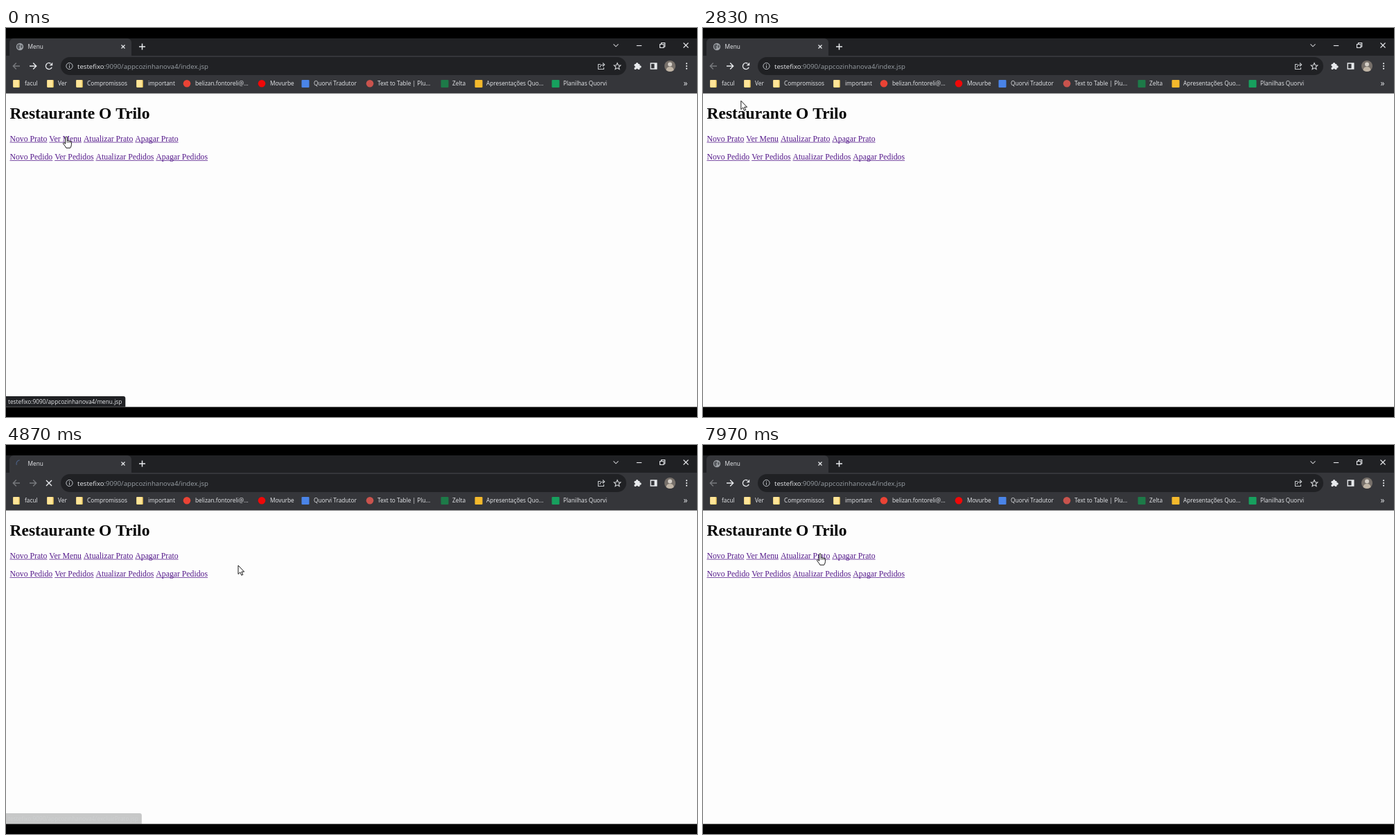
These frames come from a looping animation (997 by 562 pixels, 8 s). An HTML page with a canvas:

```html
<!DOCTYPE html>
<html lang="pt">
<head>
<meta charset="utf-8">
<title>Menu</title>
<style>
html, body { margin: 0; width: 100%; height: 100%; overflow: hidden; background: #000; }
canvas { display: block; }
</style>
</head>
<body>
<canvas id="stage" width="997" height="562"></canvas>
<script>
const ctx = document.getElementById('stage').getContext('2d');
const LOOP = 8000;
const UI = '"Open Sans", "Noto Sans", sans-serif';
const SERIF = '"Liberation Serif", "Times New Roman", serif';
const LIGHT = '#e8eaed', GREY = '#9aa0a6', DIM = '#77797d';
const DARK = '#202124', BAR = '#35363a';
const HOST = 'testefixo', PATH = ':9090/appcozinhanova4/';

// page shown: [from, page, forward enabled]
const PAGES = [
  [0, 'index', true], [1500, 'menu', false], [2200, 'index', true],
  [3550, 'index', false], [5500, 'menu', false], [6640, 'index', true]
];
const LOADS = [[1010, 1500], [3550, 5500]];
const STATUS = [
  [0, 1480, 'menu.jsp'], [3050, 4020, 'menu.jsp'],
  [4020, 4300, 'atualizarPrato.jsp'], [4300, 4780, 'excluirPrato.jsp']
];
const FADE = 120;
// pointer: time, x, y
const POINTER = [
  [0, 87, 157], [400, 87, 157], [1000, 85, 162], [1400, 85, 162],
  [1830, 20, 71], [1980, 15, 54], [2470, 15, 54], [3200, 96, 158],
  [3670, 99, 156], [3900, 99, 156], [4400, 212, 160], [4850, 335, 174],
  [4970, 335, 174], [5600, 645, 160], [5800, 645, 160], [6070, 0, 41],
  [6360, 14, 53], [6640, 14, 53], [7380, 58, 190], [7920, 169, 157], [8000, 169, 157]
];
const LINKS = [
  [163.5, ['Novo Prato', 'Ver Menu', 'Atualizar Prato', 'Apagar Prato']],
  [190, ['Novo Pedido', 'Ver Pedidos', 'Atualizar Pedidos', 'Apagar Pedidos']]
];
// bookmark: icon centre, text x, label, icon kind, colour
const BOOKMARKS = [
  [15, 27, 'facul', 'folder'], [64, 75, 'Ver', 'folder'],
  [106, 117, 'Compromissos', 'folder'], [193, 205, 'important', 'folder'],
  [261, 273, 'belizan.fontoreli@...', 'dot', '#ea4335'],
  [369, 381, 'Movurbe', 'dot', '#f00808'],
  [432, 444, 'Quorvi Tradutor', 'box', '#4a84e8'],
  [525, 536, 'Text to Table | Plu...', 'dot', '#c9534d'],
  [633, 644, 'Zelta', 'box', '#1d7a48'],
  [682, 693, 'Apresentações Quo...', 'box', '#f4b92c'],
  [793, 804, 'Planilhas Quorvi', 'box', '#17a05e']
];

function rect(x, y, w, h, color, r = 0) {
  ctx.fillStyle = color;
  ctx.beginPath();
  ctx.roundRect(x, y, w, h, r);
  ctx.fill();
}
function disc(x, y, r, color) {
  ctx.fillStyle = color;
  ctx.beginPath();
  ctx.arc(x, y, r, 0, 7);
  ctx.fill();
}
function ring(x, y, r, color, a = 0, b = Math.PI * 2, w = 1) {
  ctx.strokeStyle = color;
  ctx.lineWidth = w;
  ctx.beginPath();
  ctx.arc(x, y, r, a, b);
  ctx.stroke();
}
function line(d, x, y, color, w = 1.1) {
  ctx.save();
  ctx.translate(x, y);
  ctx.strokeStyle = color;
  ctx.lineWidth = w;
  ctx.stroke(new Path2D(d));
  ctx.restore();
}
function shape(d, x, y, fill, stroke) {
  ctx.save();
  ctx.translate(x, y);
  const p = new Path2D(d);
  ctx.fillStyle = fill;
  ctx.fill(p);
  if (stroke) {
    ctx.strokeStyle = stroke;
    ctx.lineWidth = 0.9;
    ctx.lineJoin = 'round';
    ctx.stroke(p);
  }
  ctx.restore();
}
// draws text and returns its width
function text(s, x, y, font, color) {
  ctx.font = font;
  ctx.fillStyle = color;
  ctx.fillText(s, x, y);
  return ctx.measureText(s).width;
}

function pointerAt(t) {
  const i = Math.max(1, POINTER.findIndex(p => p[0] > t));
  const [t0, x0, y0] = POINTER[i - 1], [t1, x1, y1] = POINTER[i];
  const u = (t - t0) / (t1 - t0), k = u * u * (3 - 2 * u);
  return { x: x0 + (x1 - x0) * k, y: y0 + (y1 - y0) * k };
}

function globe(x, y) {
  disc(x, y, 5.2, '#9da1a6');
  shape('M-4 -2 L-1 -4 L1 -2 L-1 0 L0 2 L-2 4 L-4 1 Z M2 -3 L4 -1 L3 2 L1 1 Z', x, y, '#55585d');
}

function tabStrip(t, load) {
  rect(0, 15, 997, 26, DARK);
  rect(5, 15, 176, 30, BAR, [6, 6, 0, 0]);
  if (load) {
    const age = t - load[0];
    const span = Math.min(1.9, 0.25 + age / 300);
    const mid = load[0] < 2000 ? 4.1 : Math.PI - (t - 3670) * Math.PI * 2 / 1320;
    ring(20, 27, 5, '#4d6287', mid - span / 2, mid + span / 2, 1.1);
  } else {
    globe(20, 27);
  }
  text('Menu', 31.5, 30, '8.3px ' + UI, LIGHT);
  line('M-2.5 -2.5 L2.5 2.5 M2.5 -2.5 L-2.5 2.5', 169, 27, LIGHT, 1.2);
  line('M-4.5 0 H4.5 M0 -4.5 V4.5', 196.5, 27, LIGHT, 1.5);
  line('M-3.5 -1.7 L0 1.8 L3.5 -1.7', 880, 25, '#c8cacd');
  line('M-3.7 0.5 H3.7', 913.5, 25, LIGHT);
  line('M-3.5 -1.5 H2 V3.5 H-3.5 Z M-1.5 -1.5 V-3.5 H3.7 V2 H2', 947, 25, LIGHT);
  line('M-3.5 -3.5 L3.5 3.5 M3.5 -3.5 L-3.5 3.5', 981, 25, LIGHT);
}

function toolbar(page, forward, loading, p) {
  rect(0, 40, 997, 54.5, BAR);
  const hover = [15, 39, 62].find(x => Math.hypot(p.x - x, p.y - 55) < 10);
  if (hover) disc(hover, 55, 10.5, '#4a4b4f');
  line('M5 0 H-4.5 M-0.2 -4.5 L-4.7 0 L-0.2 4.5', 15, 55, page === 'menu' ? LIGHT : DIM, 1.4);
  line('M-5 0 H4.5 M0.2 -4.5 L4.7 0 L0.2 4.5', 39, 55, forward ? LIGHT : DIM, 1.4);
  if (loading) {
    line('M-4 -4 L4 4 M4 -4 L-4 4', 62, 55, LIGHT, 1.4);
  } else {
    ring(62, 55, 4.5, LIGHT, 0.4, 5.3, 1.4);
    shape('M5.2 -5.2 V-0.7 H0.7 Z', 62, 55, LIGHT);
  }

  rect(79, 42, 816, 26, DARK, 13);
  ring(91.5, 55, 4.6, '#bdc1c6');
  line('M0 -2.7 V-1.4 M0 -0.6 V2.7', 91.5, 55, '#bdc1c6');
  const font = '9.65px ' + UI;
  const w = text(HOST, 103, 58.6, font, LIGHT);
  text(PATH + page + '.jsp', 103 + w, 58.6, font, GREY);

  line('M-1 -2.5 H-4.5 V4.5 H3.5 V2 M-2 2 C-2 -1 0 -2 4 -2 M2 -4.5 L4.7 -2 L2 0.5', 859, 55, '#c4c7ca');
  line('M0 -4.8 L1.4 -1.6 L4.8 -1.3 L2.2 1 L3 4.4 L0 2.6 L-3 4.4 L-2.2 1 L-4.8 -1.3 L-1.4 -1.6 Z', 882, 55.3, '#d5d7da');
  rect(906.5, 52, 8, 8, LIGHT, 1);
  disc(910.5, 51.6, 1.7, LIGHT);
  disc(915, 56, 1.7, LIGHT);
  disc(906.5, 56, 1.3, BAR);
  disc(910.5, 60, 1.3, BAR);
  line('M-4.3 -4 H4.3 V4 H-4.3 Z', 934.5, 55, LIGHT, 1.4);
  rect(935.5, 51, 3.5, 8, LIGHT);
  disc(958, 55, 8, '#77706a');
  disc(958, 52.5, 3, '#d4cec6');
  shape('M-5.5 6 Q-5 1 0 1 Q5 1 5.5 6 Q0 10 -5.5 6 Z', 958, 55, '#c0b5a6');
  for (const dy of [-3.7, 0, 3.7]) disc(982, 55 + dy, 1.1, LIGHT);
}

function bookmarks(p) {
  if (p.x > 5 && p.x < 49 && p.y > 69 && p.y < 91) rect(5, 70, 44, 20, '#434543', 10);
  for (const [cx, x, label, kind, color] of BOOKMARKS) {
    if (kind === 'folder') {
      rect(cx - 4.7, 75, 9.4, 11, '#f3cf68', 1);
      rect(cx - 4.7, 75, 7.8, 10.5, '#ffe598', 1);
    } else if (kind === 'dot') {
      disc(cx, 80.3, 5.3, color);
    } else {
      rect(cx - 5.5, 75, 11, 11, color, 1);
    }
    text(label, x, 83.3, '8.3px ' + UI, LIGHT);
  }
  text('»', 977.5, 83.5, '12px ' + UI, LIGHT);
}

// draws all links and tells whether one lies under the pointer
function links(p) {
  let hit = false;
  for (const [y, row] of LINKS) {
    let x = 5.5;
    for (const label of row) {
      const w = text(label, x, y, '11.75px ' + SERIF, '#551a8b');
      rect(x, y + 1.2, w, 0.8, '#551a8b');
      hit ||= p.x >= x && p.x <= x + w && p.y > y - 11 && p.y < y + 3;
      x += w + 11.75 / 4;
    }
  }
  return hit;
}

function content(page, p) {
  rect(0, 94.5, 997, 453, '#fdfdfd');
  const title = page === 'menu' ? 'Menu' : 'Restaurante O Trilo';
  text(title, 5.5, 131.3, 'bold 23.5px ' + SERIF, '#000');
  if (page === 'index') return links(p);
  ['Milkshake', 'Frango Grelhado', 'pizza'].forEach((dish, i) => {
    const y = 163.5 + i * 13.3;
    disc(24.8, y - 3.5, 2.1, '#000');
    text(dish, 34.5, y, '11.75px ' + SERIF, '#000');
  });
  return false;
}

function statusBar(t) {
  const s = STATUS.findLast(([from, to]) => t >= from && t < to + FADE);
  if (!s) return;
  const label = HOST + PATH + s[2];
  ctx.globalAlpha = Math.min(1, 1 - (t - s[1]) / FADE);
  ctx.font = '8.3px ' + UI;
  rect(0, 532, ctx.measureText(label).width + 8, 15.5, DARK, [0, 3, 0, 0]);
  text(label, 3, 543, '8.3px ' + UI, LIGHT);
  ctx.globalAlpha = 1;
}

function pointer({ x, y }, hand) {
  if (hand) {
    shape('M-1.3 0.8 Q0 -1.4 1.3 0.8 V6 Q2.7 4.7 3.6 6.3 Q5 5.4 5.7 7 Q7.3 6.3 7.4 8.3 V11.5 Q7.3 14 5.7 16.3 H-0.2 Q-1.5 13.5 -4 10.8 Q-5.3 8.6 -3.4 8.6 L-1.3 10.3 Z', x, y, '#fff', '#000');
    line('M1.3 6 V9 M3.6 6.5 V9 M5.7 7.2 V9', x, y, '#000', 0.7);
  } else {
    shape('M0 0 V12.5 L2.9 9.8 L4.8 14.2 L6.8 13.3 L4.9 9.1 H8.7 Z', x, y, '#fff', '#000');
  }
}

function draw(t) {
  const [, page, forward] = PAGES.findLast(s => t >= s[0]);
  const load = LOADS.find(([a, b]) => t >= a && t < b);
  const p = pointerAt(t);
  rect(0, 0, 997, 562, '#000');
  tabStrip(t, load);
  toolbar(page, forward, !!load, p);
  bookmarks(p);
  const onLink = content(page, p);
  statusBar(t);
  const busy = load === LOADS[0];
  pointer(p, onLink && !busy);
}

const start = performance.now();
function tick() {
  draw((performance.now() - start) % LOOP);
  requestAnimationFrame(tick);
}
tick();
</script>
</body>
</html>
```
